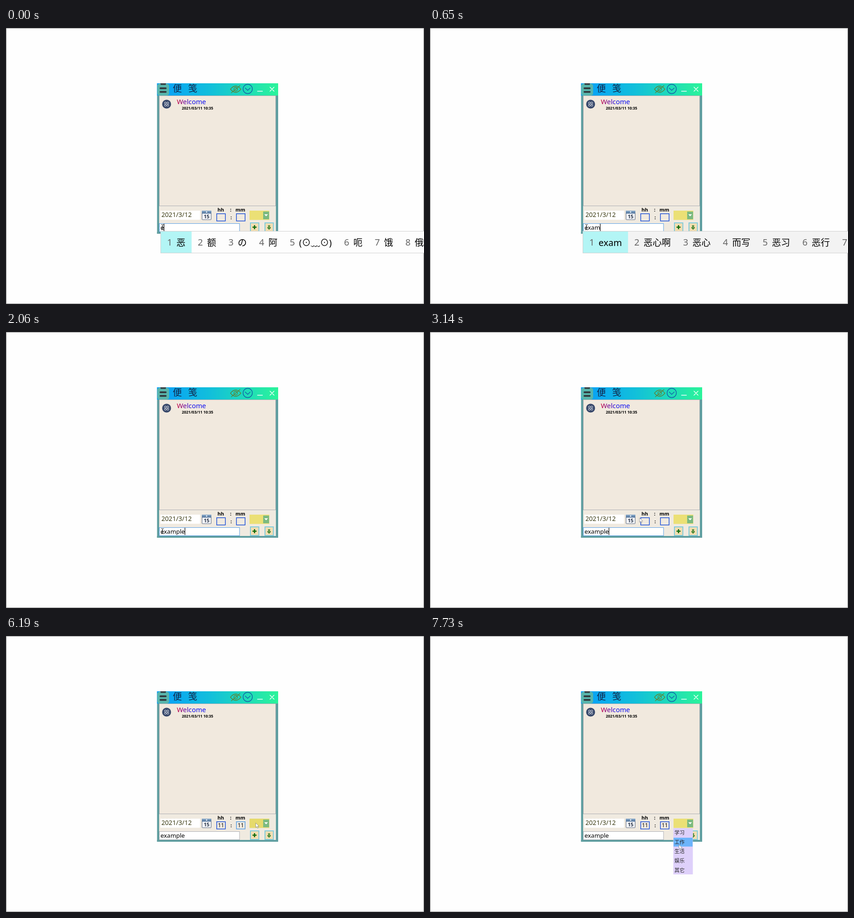
Write an HTML page that moves like this. It is 920 by 609 pixels and loops after 8 s.

```html
<!DOCTYPE html>
<html lang="zh">
<head>
<meta charset="utf-8">
<title>Sticky notes</title>
<style>
  html, body { margin: 0; width: 100%; height: 100%; overflow: hidden; background: #fefefe; }
  svg { display: block; font-family: "Noto Sans", "Noto Sans CJK SC", sans-serif; }
  text { white-space: pre; }
  .bold { font-weight: 700; font-size: 11px; }
  .line { fill: none; stroke-linecap: round; }
  .field { fill: #f0eae0; stroke-width: 1.5; }
  .btn { fill: #f2deb2; stroke: #7fcbdc; stroke-width: 2; }
  #bar { font-size: 20px; }
  #bar .num { fill: #666; }
  #menu { font-size: 11.2px; fill: #222; }
</style>
</head>
<body>
<svg width="920" height="609" viewBox="0 0 920 609">
  <defs>
    <linearGradient id="sky">
      <stop offset="0" stop-color="#069dfb"/>
      <stop offset=".45" stop-color="#12c0da"/>
      <stop offset="1" stop-color="#2bf49a"/>
    </linearGradient>
    <linearGradient id="ink">
      <stop offset="0" stop-color="#c8003c"/>
      <stop offset=".42" stop-color="#3a08d0"/>
      <stop offset=".55" stop-color="#1010f0"/>
    </linearGradient>
    <linearGradient id="steel" x2="0" y2="1">
      <stop offset="0" stop-color="#8fb0d0"/>
      <stop offset="1" stop-color="#4a6c94"/>
    </linearGradient>
  </defs>
  <rect x=".5" y=".5" width="919" height="608" fill="#fefefe" stroke="#808080"/>

  <!-- window and title bar -->
  <rect x="332.5" y="122" width="266.5" height="332" fill="#5f9ea0"/>
  <rect x="332.5" y="122" width="266.5" height="27" fill="url(#sky)"/>
  <rect x="333" y="123" width="26" height="26" rx="5" fill="#58b5ac"/>
  <path d="M340 122h12v2q0 1.500-1.500 1.500h-9q-1.500 0-1.500-1.500z" fill="#333c40"/>
  <path class="line" d="M340 133h11.500M340 141h11.500" stroke="#333c40" stroke-width="4"/>
  <g font-size="20" font-weight="300" fill="#12264a">
    <text x="367" y="141">便</text><text x="401" y="141">笺</text>
  </g>
  <g class="line" stroke="#617f32" stroke-width="1.300">
    <path d="M494 135q11.500-14 23 0q-11.500 14-23 0zM496 143L515 127"/>
    <circle cx="505.500" cy="135" r="4"/>
  </g>
  <g class="line" stroke="#145fa8" stroke-width="1.400">
    <circle cx="532" cy="134.500" r="10.200"/>
    <path d="M526.500 132.500l5.500 5 5.500-5"/>
  </g>
  <path class="line" d="M553.500 139.500h11M581 130.500l9 9M590 130.500l-9 9" stroke="#fff" stroke-width="1.400"/>

  <!-- note list -->
  <rect x="337" y="149" width="257" height="301" fill="#f0eae0"/>
  <rect x="337.500" y="149.500" width="256" height="243" fill="#f1e9de" stroke="#abadb3"/>
  <circle cx="353.500" cy="168" r="9.800" fill="#39496b"/>
  <g class="line" stroke="#e8ebf2">
    <rect x="349" y="163.500" width="3.800" height="3.800" rx="1.200"/>
    <rect x="354.200" y="163.500" width="3.800" height="3.800" rx="1.200"/>
    <rect x="349" y="168.700" width="3.800" height="3.800" rx="1.200"/>
    <rect x="354.200" y="168.700" width="3.800" height="3.800" rx="1.200"/>
  </g>
  <text x="376" y="168" font-size="14.900" fill="url(#ink)">Welcome</text>
  <text x="387" y="180" font-size="8.400" font-weight="700">2021/03/11 10:35</text>

  <!-- entry form -->
  <rect x="340" y="403" width="87" height="20" fill="#fff"/>
  <text x="342" y="417" font-size="14.100" fill="#3c3c14">2021/3/12</text>
  <rect x="431.500" y="403.500" width="20" height="19.500" rx="1" fill="#f4f6fa" stroke="#56657c"/>
  <rect x="431" y="403" width="21" height="6.500" fill="url(#steel)"/>
  <circle cx="441.500" cy="406" r="1.500" fill="#fff"/>
  <text x="441.500" y="420" font-size="11" text-anchor="middle" font-weight="600" fill="#2a3548">15</text>
  <g class="bold">
    <text x="465.500" y="405">hh</text><text x="493" y="405">:</text>
    <text x="505" y="405">mm</text><text x="494" y="421.500">:</text>
  </g>
  <rect id="hour" class="field" x="463.750" y="409.750" width="19" height="16"/>
  <rect id="minute" class="field" x="507.250" y="409.750" width="19" height="16"/>
  <g font-size="11.700">
    <text id="hourText" x="466.500" y="422"></text>
    <text id="minuteText" x="510" y="422"></text>
  </g>
  <rect id="combo" x="536" y="403" width="43.500" height="20.500"/>
  <rect x="566" y="405" width="13" height="17" fill="#7cba80"/>
  <path d="M568.500 411h8l-4 4.500z" fill="#fff"/>
  <rect id="note" x="337.500" y="431.500" width="176.500" height="18" fill="#fff"/>
  <text id="noteText" x="340" y="445" font-size="13.400"></text>
  <rect class="btn" x="538" y="430" width="18.500" height="19"/>
  <path d="M542.500 439.500h9M547 435v9" stroke="#0a690a" stroke-width="2.600"/>
  <rect class="btn" x="570" y="430" width="18.500" height="19"/>
  <path d="M577.700 435v6.500M580.300 435v6.500M575.500 440l3.500 4 3.500-4" fill="none" stroke="#0a690a" stroke-width="1.400"/>
  <rect x="332.500" y="450" width="266.500" height="4" fill="#5f9ea0"/>

  <rect id="caret" width="1.200"/>
  <g id="menu"></g>
  <g id="bar"></g>
  <path id="beam" class="line" d="M-2.500-5.500h1.700l.8.700.8-.7h1.700M0-4.800v9.600M-2.500 5.500h1.700l.8-.7.8.7h1.700" stroke="#111"/>
  <path id="arrow" d="M0 0v10l2.400-2.200 1.700 3.800 1.700-.8-1.700-3.600h3.300z" fill="#fff" stroke="#777" stroke-width=".7"/>
</svg>
<script>
const $ = id => document.getElementById(id);
const LOOP = 8000;

// Each track is a list of [start time, ...values]; a value holds until the next start.
const tracks = {
  note: [[0, 1], [140, 2], [400, 3], [650, 4], [1030, 5], [1310, 6], [1680, 7]],
  bar: [
    [0, 340, '恶 额 の 阿 (⊙﹏⊙) 呃 饿 俄', '#fdfdfd'],
    [140, 340, '恶心 而写 恶习 恶行 二线 而 额 饿', '#f3f3f3'],
    [400, 340, '恶心啊 恶心 而写 恶习 恶行 二线 而', '#f3f3f3'],
    [650, 336, 'exam 恶心啊 恶心 而写 恶习 恶行 而', '#f3f3f3'],
    [1030, 307, 'example 恶心啊 恶心 而写 恶习 恶行 而', '#f3f3f3'],
    [2060, 0, '']
  ],
  focus: [[0, 'note'], [3660, 'hour'], [5160, 'minute'], [6850, '']],
  hover: [[0, ''], [3260, 'hour'], [4550, ''], [4790, 'minute'], [6070, 'combo'], [7220, '']],
  hour: [[0, ''], [3910, '1'], [4150, '11']],
  minute: [[0, ''], [5430, '1'], [5560, '11']],
  caret: [[0, 1], [2310, 0], [2720, 1], [3260, 0], [3910, 1], [4550, 0],
    [5280, 1], [5950, 0], [6700, 1], [6850, 0]],
  menu: [[0, -2], [6850, -1], [7220, 0], [7340, 1]],
  pointer: [
    [0, 'beam', 344.5, 439.5], [2720, 'beam', 388, 437],
    [2860, 'arrow', 425, 424], [2990, 'arrow', 452, 413], [3140, 'arrow', 461, 410],
    [3260, 'beam', 472, 412], [3910, ''],
    [4550, 'arrow', 486, 412], [4670, 'arrow', 495, 413],
    [4790, 'beam', 509.5, 416], [4910, 'beam', 512.5, 417], [5430, ''],
    [5950, 'beam', 519, 417], [6070, 'arrow', 536, 413], [6190, 'arrow', 549.5, 412.5],
    [6310, 'arrow', 555, 412], [6430, 'arrow', 557, 412], [6550, 'arrow', 556, 412],
    [7220, 'arrow', 549, 432], [7340, 'arrow', 545, 453],
    [7490, 'arrow', 546, 455], [7610, 'arrow', 547.5, 458], [7730, 'arrow', 548, 460.5]
  ]
};

const at = (name, t) => tracks[name].filter(k => k[0] <= t).pop().slice(1);

const rect = (x, y, w, h, fill, extra = '') =>
  `<rect x="${x}" y="${y}" width="${w}" height="${h}" fill="${fill}" ${extra}/>`;
const label = (x, y, s, cls = '') => `<text x="${x}" y="${y}" class="${cls}">${s}</text>`;

function widthOf(s) {
  $('bar').innerHTML = label(0, 0, s);
  return $('bar').firstChild.getComputedTextLength();
}

function drawBar([left, words, fill]) {
  if (!words) return $('bar').innerHTML = '';
  let x = left + 14.5, pick = 0, out = '';
  words.split(' ').forEach((word, i) => {
    out += label(x, 480, i + 1, 'num') + label(x + 20.5, 480.5, word);
    x += 20.5 + widthOf(word) + 27;
    pick ||= x - 13.5 - left;
  });
  $('bar').innerHTML = rect(left + .5, 448.5, 940 - left, 48, fill, 'stroke="#cfcfcf"') +
    rect(left + 1, 449, pick - 1, 47, '#b3f5f5') + out;
}

function drawMenu([pick]) {
  $('menu').innerHTML = pick < -1 ? '' : rect(535.5, 424, 43, 102, '#ded0fa') +
    (pick < 0 ? '' : rect(536, 424.5 + pick * 20.6, 42, 19.5, '#6cb4fb')) +
    ['学习', '工作', '生活', '娱乐', '其它'].map((s, i) => label(538, 438 + i * 20.7, s)).join('');
}

const cache = {};
function refresh(name, value, draw) {
  if (cache[name] === String(value)) return;
  cache[name] = String(value);
  draw(value);
}

function frame(now) {
  const t = now % LOOP;
  const [focus] = at('focus', t), [hover] = at('hover', t);
  $('noteText').textContent = 'example'.slice(0, at('note', t)[0]);
  for (const id of ['hour', 'minute']) $(id + 'Text').textContent = at(id, t)[0];
  for (const id of ['note', 'hour', 'minute']) {
    const idle = id === 'note' ? '#abadb3' : '#1c50d8';
    $(id).style.stroke = id === focus ? '#569de5' : id === hover ? '#7eb4ea' : idle;
  }
  $('combo').style.fill = hover === 'combo' ? '#e6da6c' : '#ebe075';

  const caret = $('caret');
  caret.style.display = focus && at('caret', t)[0] ? '' : 'none';
  if (focus) {
    const text = $(focus + 'Text'), big = focus === 'note';
    caret.setAttribute('x', +text.getAttribute('x') + text.getComputedTextLength() - .4);
    caret.setAttribute('y', big ? 432 : 410.5);
    caret.setAttribute('height', big ? 16 : 14);
  }

  refresh('bar', at('bar', t), drawBar);
  refresh('menu', at('menu', t), drawMenu);

  const [kind, x, y] = at('pointer', t);
  for (const id of ['beam', 'arrow']) {
    $(id).style.display = id === kind ? '' : 'none';
    if (id === kind) $(id).setAttribute('transform', `translate(${x} ${y})`);
  }
  requestAnimationFrame(frame);
}

const start = performance.now();
(function tick() {
  const run = requestAnimationFrame;
  frame(Math.max(0, performance.now() - start));
})();
</script>
</body>
</html>
```
